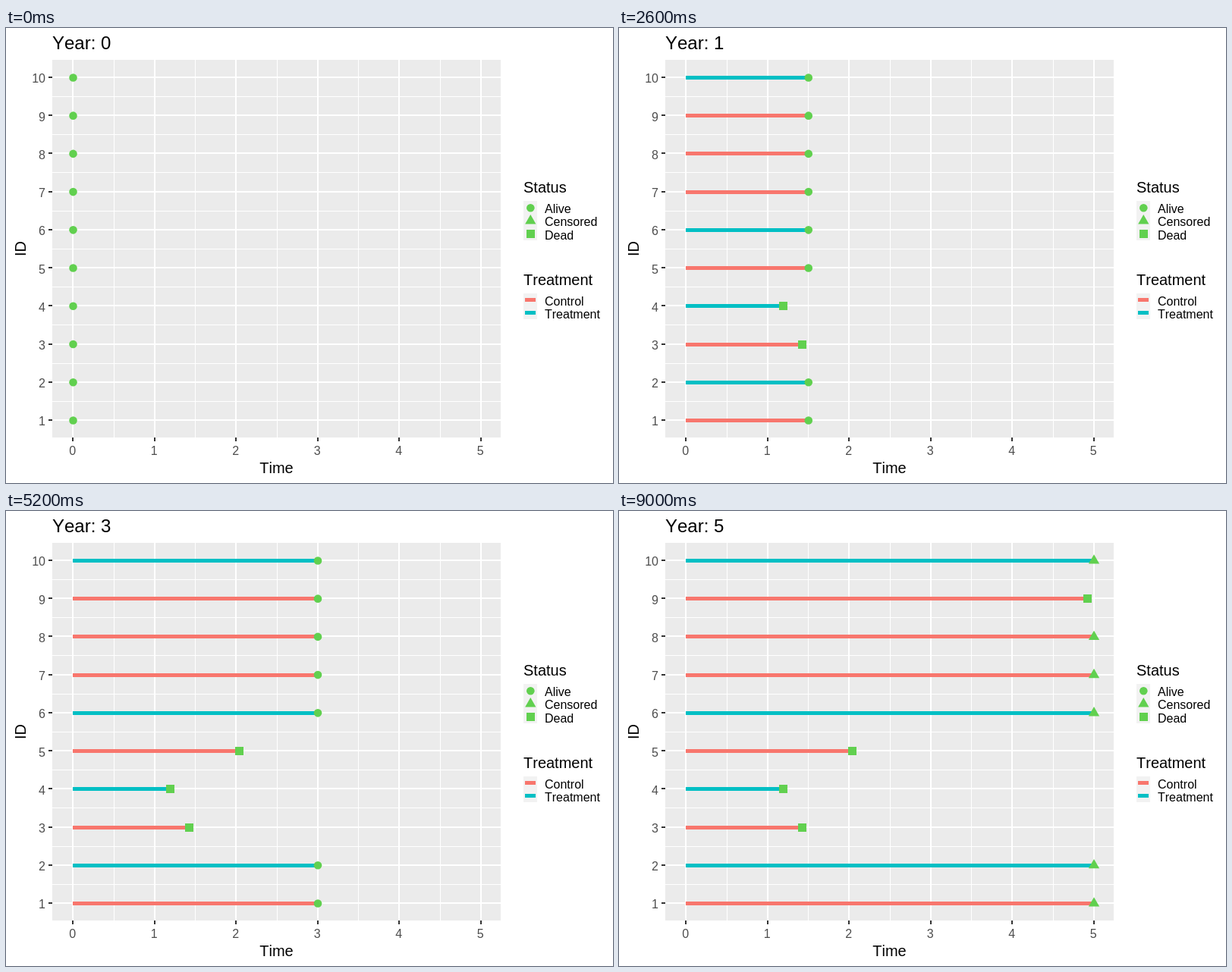
These frames come from a looping animation (800x600 px, 10000 ms). An HTML page with a canvas:

```html
<!DOCTYPE html>
<html lang="en">
<head>
<meta charset="utf-8">
<title>Follow-up by ID</title>
<style>
html, body { margin: 0; width: 100%; height: 100%; overflow: hidden; background: #fff; }
canvas { display: block; width: 800px; height: 600px; }
</style>
</head>
<body>
<canvas id="stage" width="800" height="600"></canvas>
<script>
const ctx = document.getElementById('stage').getContext('2d');
const FONT = '"Liberation Sans", Arial, sans-serif';
const GREEN = '#61D04F', RED = '#F8766D', TEAL = '#00BFC4';
const LOOP = 10000, STEP = 100, LAST = 90;
const R = 5.3;

// Observations are 0.3 years apart; each lands on a whole animation step.
const ROW_YEARS = 0.3, ROW_STEPS = 5.21, END = 5;
const deaths = { 3: 1.422, 4: 1.19, 5: 2.04, 9: 4.92 };
const treated = [2, 4, 6, 10];

const xAt = t => 88 + 107.5 * t;
const yAt = id => 517.45 - 50.225 * (id - 1);
const rowStep = n => Math.round(n * ROW_STEPS);

function rect(color, x, y, w, h) {
  ctx.fillStyle = color;
  ctx.fillRect(x, y, w, h);
}

function label(str, x, y, size, color = '#000', align = 'left') {
  ctx.font = `${size}px ${FONT}`;
  ctx.fontKerning = 'none';
  ctx.fillStyle = color;
  ctx.textAlign = align;
  ctx.fillText(str, x, y);
}

function marker(status, x, y) {
  if (status === 'Dead') {
    rect(GREEN, Math.round(x - 5.5), Math.round(y - 5.5), 11, 11);
    return;
  }
  ctx.fillStyle = GREEN;
  ctx.beginPath();
  if (status === 'Alive') {
    ctx.arc(x, y, R, 0, Math.PI * 2);
  } else {
    ctx.moveTo(x, y - 1.555 * R);
    ctx.lineTo(x + 1.347 * R, y + 0.777 * R);
    ctx.lineTo(x - 1.347 * R, y + 0.777 * R);
  }
  ctx.fill();
}

function drawPanel() {
  rect('#EBEBEB', 61, 42, 591, 498);
  for (let t = 0.5; t < 5; t++) rect('#fff', Math.round(xAt(t)), 42, 1, 498);
  for (let id = 1.5; id < 10; id++) rect('#fff', 61, Math.floor(yAt(id)), 591, 1);

  for (let t = 0; t <= 5; t++) {
    const x = Math.round(xAt(t));
    rect('#fff', x - 1, 42, 2, 498);
    rect('#333', x - 1, 540, 2, 5);
    label(t, xAt(t) - 0.3, 563, 16, '#4D4D4D', 'center');
  }
  for (let id = 1; id <= 10; id++) {
    const y = Math.floor(yAt(id));
    rect('#fff', 61, y - 1, 591, 2);
    rect('#333', 56, y - 1, 5, 2);
    label(id, 52, Math.round(yAt(id)) + 7, 16, '#4D4D4D', 'right');
  }

  label('Time', 356.5, 587, 20, '#000', 'center');
  ctx.save();
  ctx.translate(26, 291);
  ctx.rotate(-Math.PI / 2);
  label('ID', 0, 0, 20, '#000', 'center');
  ctx.restore();
}

function drawLegend() {
  label('Status', 682, 217, 20);
  rect('#F2F2F2', 682, 228, 18, 52);
  [['Alive', 244], ['Censored', 261], ['Dead', 279]].forEach(([name, base], i) => {
    marker(name, 691.3, 237.2 + 17.1 * i);
    label(name, 710, base, 16);
  });

  label('Treatment', 682, 339, 20);
  rect('#F2F2F2', 682, 350, 18, 34);
  [['Control', RED], ['Treatment', TEAL]].forEach(([name, color], i) => {
    rect(color, 684, 356 + 17 * i, 14, 5);
    label(name, 710, 366 + 17 * i, 16);
  });
}

// Time and status of one subject at an animation step.
function stateOf(id, step) {
  let n = 0;
  while (n < 17 && rowStep(n + 1) <= step) n++;
  const stop = deaths[id] || END;
  const from = Math.min(n * ROW_YEARS, stop);
  const to = Math.min((n + 1) * ROW_YEARS, stop);
  const p = (step - rowStep(n)) / (rowStep(n + 1) - rowStep(n));
  const ahead = p > 0 ? (n + 1) * ROW_YEARS : n * ROW_YEARS;
  let status = 'Alive';
  if (deaths[id]) {
    if (ahead >= stop) status = 'Dead';
  } else if (step === LAST) {
    status = 'Censored';
  }
  return { time: from + (to - from) * p, status };
}

function draw(step) {
  rect('#fff', 0, 0, 800, 600);
  drawPanel();
  drawLegend();
  label('Year: ' + Math.round(step * 5 / 99), 61, 28, 24);

  for (let id = 1; id <= 10; id++) {
    const { time, status } = stateOf(id, step);
    const x = xAt(time);
    rect(treated.includes(id) ? TEAL : RED, 88, Math.floor(yAt(id)) - 2, x - 88, 5);
    marker(status, x + 0.5, yAt(id));
  }
}

const start = performance.now();
function tick() {
  const t = (performance.now() - start) % LOOP;
  draw(Math.min(LAST, Math.floor(t / STEP)));
  requestAnimationFrame(tick);
}
tick();
</script>
</body>
</html>
```
